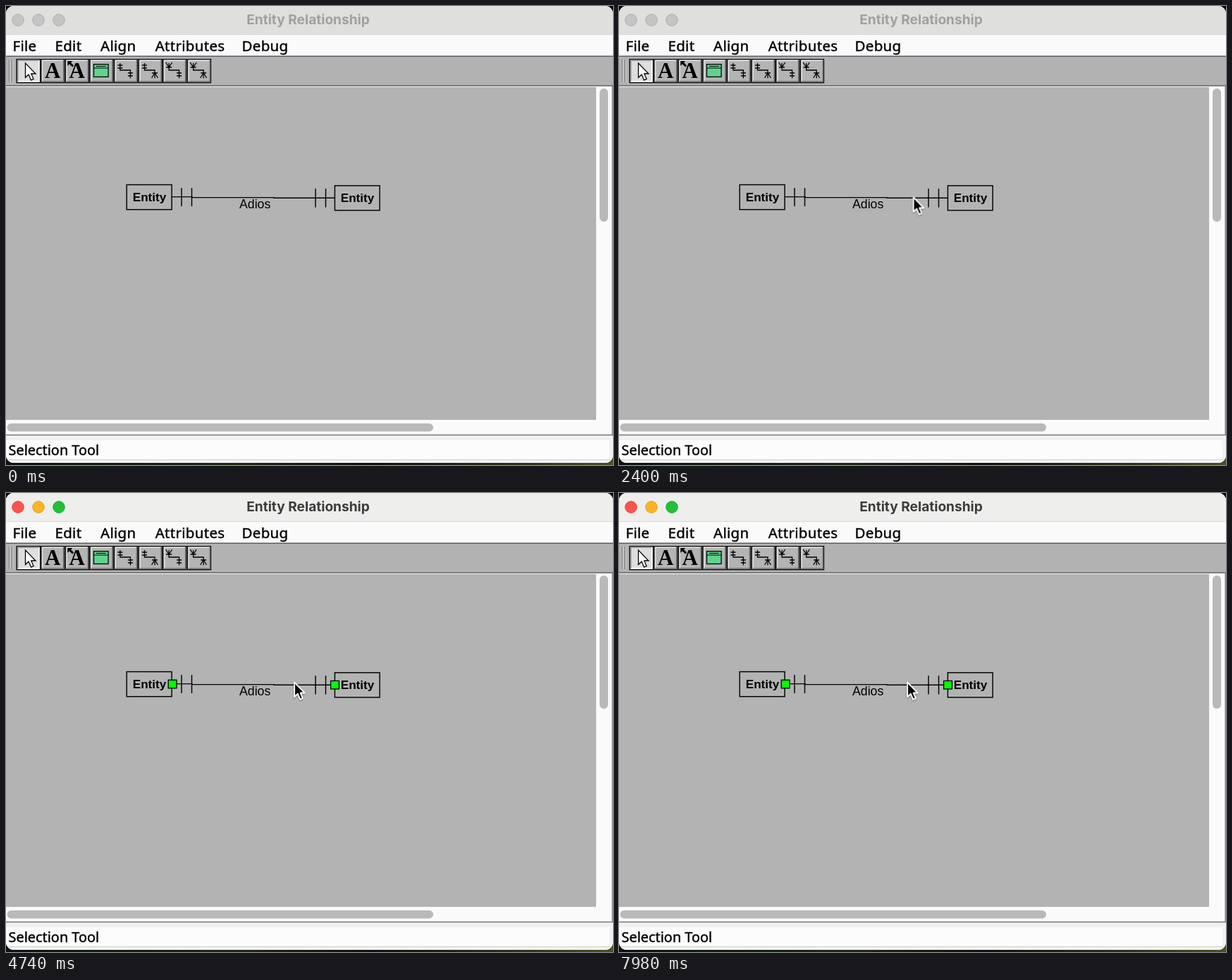
An HTML page that plays this animation: 861 px wide and 651 px high, repeating every 8000 ms.

```html
<!DOCTYPE html>
<html lang="en">
<head>
<meta charset="utf-8">
<title>Entity Relationship</title>
<style>
  html, body { margin: 0; width: 100%; height: 100%; overflow: hidden; background: #000; }
  svg { display: block; width: 861px; height: 651px; }
  .ui { font: 20.5px "Noto Sans", "Open Sans", sans-serif; letter-spacing: .3px; stroke: #000; stroke-width: .4px; }
  .status { font-size: 19.9px; letter-spacing: 0; }
  .title { font: 700 19.1px Inter, sans-serif; text-anchor: middle; }
  .label { font: 17.7px "Liberation Sans", Arial, sans-serif; }
  .entity { font-weight: 700; font-size: 17.1px; text-anchor: middle; }
  .glyph { font: 700 31px "Liberation Serif", serif; text-anchor: middle; }
  .line { fill: none; stroke: #000; stroke-width: 1.45px; }
</style>
</head>
<body>
<svg viewBox="0 0 861 651">
  <defs>
    <linearGradient id="desk">
      <stop offset="0" stop-color="#08130f"/>
      <stop offset=".38" stop-color="#1c2a12"/>
      <stop offset=".6" stop-color="#0c130e"/>
      <stop offset=".85" stop-color="#2a3315"/>
      <stop offset="1" stop-color="#48521f"/>
    </linearGradient>
    <clipPath id="frame"><rect width="861" height="648" rx="11"/></clipPath>
    <filter id="shadow" x="-50%" y="-50%" width="200%" height="200%">
      <feDropShadow dx="0" dy="1.2" stdDeviation="1.2" flood-opacity=".4"/>
    </filter>
    <path id="arrow" d="M0 0V20.5L4.6 16.2 8 24.2 11.6 22.6 8.3 15H14.5Z"/>
  </defs>

  <rect y="600" width="861" height="51" fill="url(#desk)"/>
  <g clip-path="url(#frame)">
    <rect width="861" height="651" fill="#f0f0f0"/>
    <rect width="861" height="41" fill="#dfe0de"/>
    <g fill="#c4c4c4" stroke="#adadad">
      <circle cx="17" cy="20" r="8.3"/><circle cx="46" cy="20" r="8.3"/><circle cx="75" cy="20" r="8.3"/>
    </g>
    <text class="title" x="428.5" y="26" fill="#a0a19f">Entity Relationship</text>
    <g class="active">
      <rect width="861" height="41" fill="#eeeeed"/>
      <circle cx="17" cy="20" r="8.3" fill="#fc524d" stroke="#e2463f"/>
      <circle cx="46" cy="20" r="8.3" fill="#fdb324" stroke="#e0a028"/>
      <circle cx="75" cy="20" r="8.3" fill="#22c036" stroke="#1aab29"/>
      <text class="title" x="428.5" y="26" fill="#3c3c3c">Entity Relationship</text>
    </g>

    <path d="M0 40.5H861" stroke="#d8d8dc"/>
    <rect y="41" width="861" height="30" fill="#fafafa"/>
    <g class="ui">
      <text x="9.5" y="63.5">File</text>
      <text x="69.5" y="63.5">Edit</text>
      <text x="134" y="63.5">Align</text>
      <text x="211.7" y="63.5">Attributes</text>
      <text x="334.5" y="63.5">Debug</text>
    </g>
    <rect y="70.5" width="861" height="1.5" fill="#5b5b68"/>
    <rect y="72" width="861" height="41" fill="#b2b2b2"/>
    <path d="M4.5 76V108M8.5 76V108" stroke="#777"/>
    <path d="M5.5 76V108M9.5 76V108" stroke="#d5d5d5"/>
    <g id="tools"></g>

    <rect y="113" width="861" height="495.5" fill="#fafafa"/>
    <rect y="112.4" width="861" height="1.5" fill="#666"/>
    <rect y="115" width="837" height="472" fill="#b3b3b3"/>
    <path d="M860.2 113V608" stroke="#777" stroke-width="1.4"/>
    <rect x="842" y="117" width="12" height="189" rx="6" fill="#b9b9b9"/>
    <rect x="1.5" y="592" width="604.5" height="11.5" rx="5.7" fill="#b9b9b9"/>
    <rect y="607.7" width="861" height="1.5" fill="#77777c"/>
    <rect y="610" width="861" height="38" fill="#f1f1f1"/>
    <rect y="616" width="856" height="27" fill="#fcfcfc"/>
    <path d="M0 643.5H857" stroke="#cfcfcf"/>
    <text class="ui status" x="3.5" y="637">Selection Tool</text>

    <rect class="line" x="171.2" y="253.5" width="63.9" height="35.2"/>
    <rect class="line" x="466.4" y="254.8" width="63.7" height="35"/>
    <path class="line" d="M235 270.6H264V271.6H380V272.2H466M249 258V284M263.5 258V284M439 259V285.5M453.5 259V285.5"/>
    <text class="label entity" x="203.5" y="276.5">Entity</text>
    <text class="label entity" x="498.5" y="278">Entity</text>
    <text class="label" x="331" y="287">Adios</text>
    <g class="active" fill="#0f0" stroke="#000" stroke-width="1.3">
      <rect x="230.2" y="265.2" width="11.8" height="11.6"/>
      <rect x="460.6" y="266.4" width="11.8" height="11.6"/>
    </g>
  </g>
  <g id="cursor" opacity="0">
    <use href="#arrow" x="1.2" y="1.5" stroke="#fff" stroke-width="1.8" stroke-linejoin="round" filter="url(#shadow)"/>
  </g>
</svg>
<script>
const LOOP = 8000;
const SELECT_AT = 4260;

const bar = (x, y) => `M${x - 3.5} ${y}h7`;
const foot = (x, y, dir) =>
  `M${x - 4.5} ${y + 4 * dir}L${x} ${y - 3 * dir}L${x + 4.5} ${y + 4 * dir}M${x - 4} ${y - 3 * dir}h8`;

// Elbow connector with a bar pair or crow's foot at either end
function relation(startMany, endMany) {
  const start = startMany ? foot(8.5, 9, -1) : bar(8.5, 9) + bar(8.5, 13);
  const end = endMany ? foot(23, 23, 1) : bar(23, 20) + bar(23, 24);
  return `<path class="line" style="stroke-width:1.3px" d="M8.5 6V16H23V27.5${start}${end}"/>`;
}

const icons = [
  `<use href="#arrow" x="12.5" y="6" fill="#fff" stroke="#000" stroke-width="1.3"/>`,
  `<text class="glyph" x="16.5" y="27">A</text>`,
  `<text class="glyph" x="16.5" y="27">A</text>
   <path d="M3 3H10L7.8 5.2 12 9.4 10 11.4 5.5 7.2 3 10Z"/>`,
  `<rect x="5.7" y="7.7" width="20.6" height="17.8" fill="#5ed48b" stroke="#000" stroke-width="1.3"/>
   <path class="line" d="M6 13H26M9 10.5H23" style="stroke-width:1.1px"/>`,
  relation(false, false), relation(false, true), relation(true, false), relation(true, true)
];

document.getElementById("tools").innerHTML = icons.map((icon, i) => {
  const pressed = i === 0;
  const [light, dark] = pressed ? ["#999", "#fff"] : ["#e4e4e4", "#777"];
  return `<g transform="translate(${15 + 34.6 * i} 75)">
    <rect x=".2" y=".7" width="33" height="33" fill="${pressed ? "#dedede" : "#b4b4b4"}" stroke="#111" stroke-width="1.5"/>
    <path d="M2 32V2.3H32" fill="none" stroke="${light}" stroke-width="1.5"/>
    <path d="M2 32H32V2" fill="none" stroke="${dark}" stroke-width="1.5"/>
    ${icon}</g>`;
}).join("");

// time, x, y, opacity, easing towards the next step
const path = [
  [0, 560, 655, 0, "step-end"],
  [300, 560, 655, 1, "ease-out"],
  [720, 523, 469, 1, "linear"],
  [820, 523, 469, 1, "ease-in-out"],
  [1660, 474, 289, 1, "linear"],
  [1800, 474, 289, 1, "ease-in-out"],
  [2600, 408, 267, 1, "linear"],
  [LOOP, 408, 267, 1, "linear"]
];
const options = { duration: LOOP, iterations: Infinity };

document.getElementById("cursor").animate(path.map(([time, x, y, opacity, easing]) => ({
  offset: time / LOOP, transform: `translate(${x}px, ${y}px)`, opacity, easing
})), options);

for (const part of document.querySelectorAll(".active")) {
  part.animate([
    { offset: 0, opacity: 0, easing: "step-end" },
    { offset: SELECT_AT / LOOP, opacity: 1 },
    { offset: 1, opacity: 1 }
  ], options);
}
</script>
</body>
</html>
```
